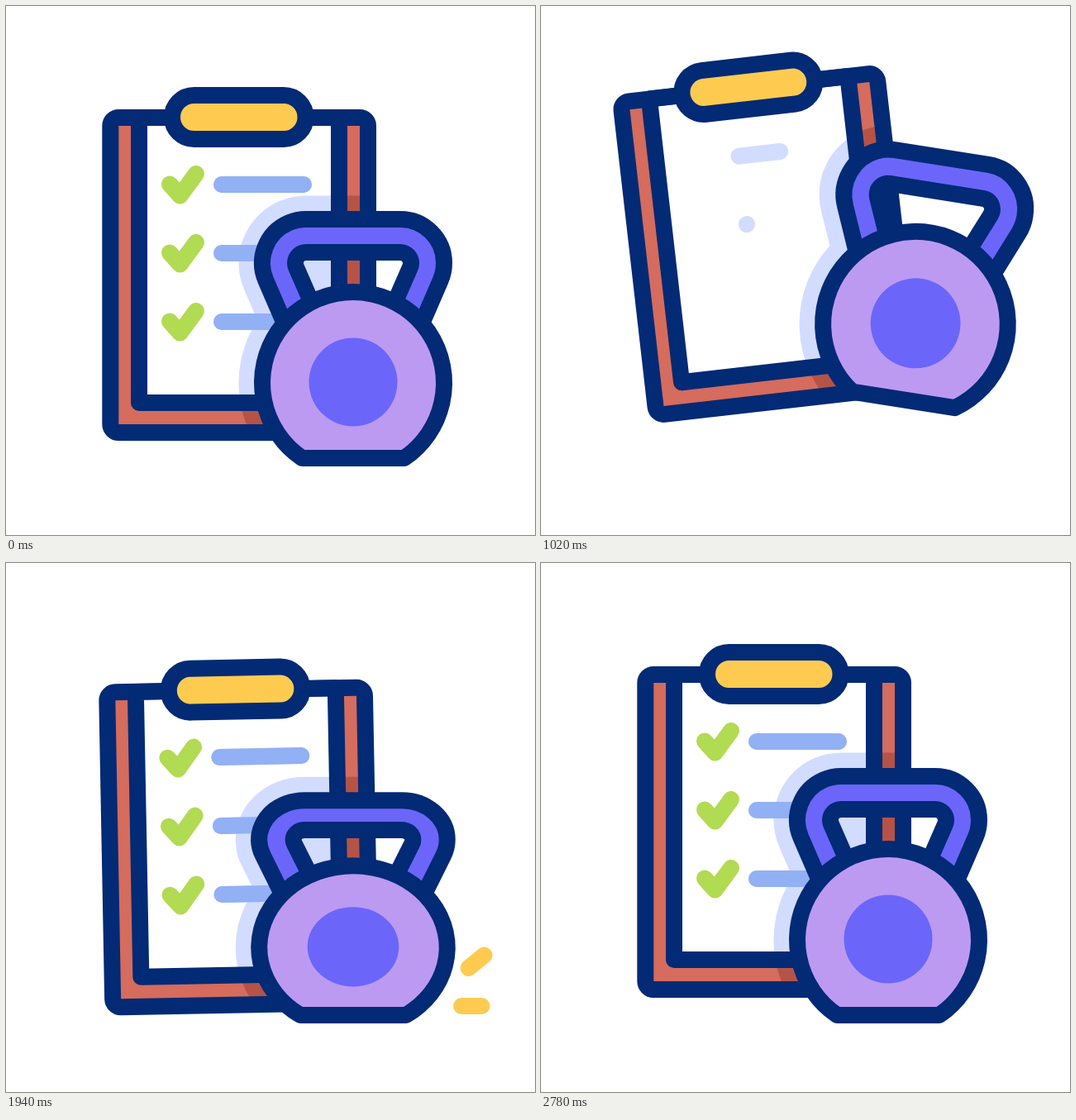
An HTML page with a canvas that plays this animation: 640x640 px, repeating every 2.96 s.

```html
<!DOCTYPE html>
<html lang="en">
<head>
<meta charset="utf-8">
<title>Workout checklist</title>
<style>
html, body { margin: 0; width: 100%; height: 100%; overflow: hidden; background: #fff; }
canvas { display: block; }
</style>
</head>
<body>
<canvas id="stage" width="640" height="640"></canvas>
<script type="module">
const ctx = document.getElementById('stage').getContext('2d');
const LOOP = 2960;
const NAVY = '#032a75', RED = '#d56c5d', DARK_RED = '#b55347', YELLOW = '#fecb50',
  GREEN = '#b1db52', BLUE = '#92b0f4', PALE = '#d1dcff', VIOLET = '#6b66f9', LILAC = '#bc9af2';

// ---- timing ----
function bezier(x1, y1, x2, y2) {
  const at = (s, p, q) => 3 * s * (1 - s) * ((1 - s) * p + s * q) + s ** 3;
  return x => {
    let lo = 0, hi = 1;
    for (let i = 0; i < 24; i++) {
      const mid = (lo + hi) / 2;
      if (at(mid, x1, x2) < x) lo = mid; else hi = mid;
    }
    return at(lo, y1, y2);
  };
}
const soft = bezier(.4, 0, .6, 1), fall = bezier(.6, 0, .6, 1);
const leap = bezier(.2, .45, .3, 1), turn = bezier(.25, .5, .35, 1);

function progress(t, start, length, ease = soft) {
  const u = (t - start) / length;
  return u <= 0 ? 0 : u >= 1 ? 1 : ease(u);
}

// Each step is [start, end, value, easing].
const track = (first, ...steps) => t => steps.reduce(
  (v, [start, end, to, ease]) => v + (to - v) * progress(t, start, end - start, ease), first);

// Squat, leap, landing, rebound, rest.
const bounce = (rest, squat, air, land, rebound) => track(rest,
  [220, 500, squat, soft], [500, 1600, air, leap], [1600, 2000, land, fall],
  [2000, 2380, rebound, soft], [2380, 2780, rest, soft]);

const board = {
  x: track(0, [500, 1600, -11, leap], [1600, 2000, 0, fall]),
  y: bounce(0, 33.8, -51, 22.5, -11.5),
  angle: track(0, [520, 1600, -8, turn], [1600, 2040, 0, fall],
    [2040, 2380, -1.95, soft], [2380, 2780, 0, soft])
};
const bell = {
  x: track(0, [500, 1600, 22, leap], [1600, 1880, 0, fall]),
  y: track(0, [500, 1600, -84, leap], [1600, 1880, 0, fall]),
  angle: track(0, [520, 1600, 11, turn], [1600, 1880, 0, fall]),
  wide: bounce(1, 1.104, 1, 1.036, 1),
  tall: bounce(1, .8, 1.06, .89, 1.034),
  gripWide: bounce(1, 1.03, 1, 1.036, 1),
  gripTall: bounce(1, .895, 1.06, .89, 1.034),
  gripDrop: bounce(0, 10.5, 0, 0, 0)
};

// ---- shapes in their resting place ----
function shape(build) {
  const path = new Path2D();
  build(path);
  return path;
}
const line = (...points) => shape(p => points.forEach(([x, y]) => p.lineTo(x, y)));
const box = (x, y, w, h, r) => shape(p => p.roundRect(x, y, w, h, r));

const backing = box(126.3, 135, 311.7, 381, 10);
const paper = box(161, 135, 242, 345, 0);
const clip = box(201, 108, 161.5, 53, 26.5);

const flat = Math.asin(91 / 110);
const ball = shape(p => {
  p.arc(420, 456, 110, Math.PI - flat, flat);
  p.closePath();
});
const core = shape(p => p.arc(420, 455, 53.5, 0, 7));
const lean = .412, upward = -Math.PI / 2;
const grip = shape(p => {
  p.moveTo(342, 396);
  p.arc(363, 311, 53, Math.PI - lean, upward);
  p.arc(477, 311, 53, upward, lean);
  p.lineTo(498, 396);
  p.lineTo(465, 371);
  p.arc(477, 311, 13, lean, upward, true);
  p.arc(363, 311, 13, upward, Math.PI - lean, true);
  p.lineTo(375, 371);
  p.closePath();
});

const rows = [[99, 99], [86, 78], [89, 89]].map(([pale, blue], i) => {
  const y = 216 + 83 * i;
  return {
    check: line([198, y - .5], [210.5, y + 13.5], [230, y - 13]),
    pale: line([261, y], [261 + pale, y]), paleLength: pale,
    blue: line([261, y], [261 + blue, y]), blueLength: blue
  };
});
const sparks = [line([559.5, 490], [604.5, 453.5]), line([551, 536], [608.5, 536])];

// ---- drawing ----
function moved(path, matrix) {
  const result = new Path2D();
  result.addPath(path, matrix);
  return result;
}
function fill(path, color) {
  ctx.fillStyle = color;
  ctx.fill(path);
}
function stroke(path, color, width = 20) {
  ctx.strokeStyle = color;
  ctx.lineWidth = width;
  ctx.stroke(path);
}
function outlined(path, color) {
  fill(path, color);
  stroke(path, NAVY);
}
// Strokes only the part of a path between two fractions of its length.
function trimmed(path, color, length, from, to) {
  if (to <= from) return;
  ctx.setLineDash([(to - from) * length, 999]);
  ctx.lineDashOffset = -from * length;
  stroke(path, color);
  ctx.setLineDash([]);
}
function shade(area, color, paths) {
  ctx.save();
  ctx.clip(area);
  for (const path of paths) {
    fill(path, color);
    stroke(path, color, 57);
  }
  ctx.restore();
}

function draw(t) {
  ctx.fillStyle = '#fff';
  ctx.fillRect(0, 0, 640, 640);
  ctx.lineCap = ctx.lineJoin = 'round';

  const boardPose = new DOMMatrix()
    .translate(282 + board.x(t), 325.5 + board.y(t))
    .rotate(board.angle(t)).translate(-282, -325.5);
  const bellPose = (wide, tall, drop = 0) => new DOMMatrix()
    .translate(420 + bell.x(t), 547 + bell.y(t))
    .rotate(bell.angle(t)).translate(0, drop).scale(wide, tall).translate(-420, -547);
  const onBoard = path => moved(path, boardPose);

  const ballPose = bellPose(bell.wide(t), bell.tall(t));
  const body = moved(ball, ballPose);
  const drop = bell.gripDrop(t), gripTall = bell.gripTall(t);
  const handle = moved(grip, bellPose(bell.gripWide(t), gripTall, drop));
  const shadow = [body, moved(grip, bellPose(bell.wide(t), gripTall, drop))];

  const back = onBoard(backing), sheet = onBoard(paper);
  fill(back, RED);
  shade(back, DARK_RED, shadow);
  fill(sheet, '#fff');
  shade(sheet, PALE, shadow);
  stroke(sheet, NAVY);
  stroke(back, NAVY);

  rows.forEach((row, i) => {
    const erasing = t < 800;
    const part = (path, color, length, out, start, span) => trimmed(onBoard(path), color, length,
      erasing ? progress(t, out, 220) : 0, erasing ? 1 : progress(t, start, span));
    part(row.pale, PALE, row.paleLength, 220 + 40 * i, 870 + 140 * i, 300);
    part(row.blue, BLUE, row.blueLength, 220 + 40 * i, 1145 + 60 * i, 460);
    part(row.check, GREEN, 51.7, 220 + 80 * i, 1145 + 60 * i, 460);
  });
  outlined(onBoard(clip), YELLOW);

  outlined(handle, VIOLET);
  outlined(body, LILAC);
  fill(moved(core, ballPose), VIOLET);

  for (const spark of sparks)
    trimmed(spark, YELLOW, 57.7, progress(t, 1950, 200), progress(t, 1850, 200));
}

function tick() {
  draw(performance.now() % LOOP);
  requestAnimationFrame(tick);
}
tick();
</script>
</body>
</html>
```
